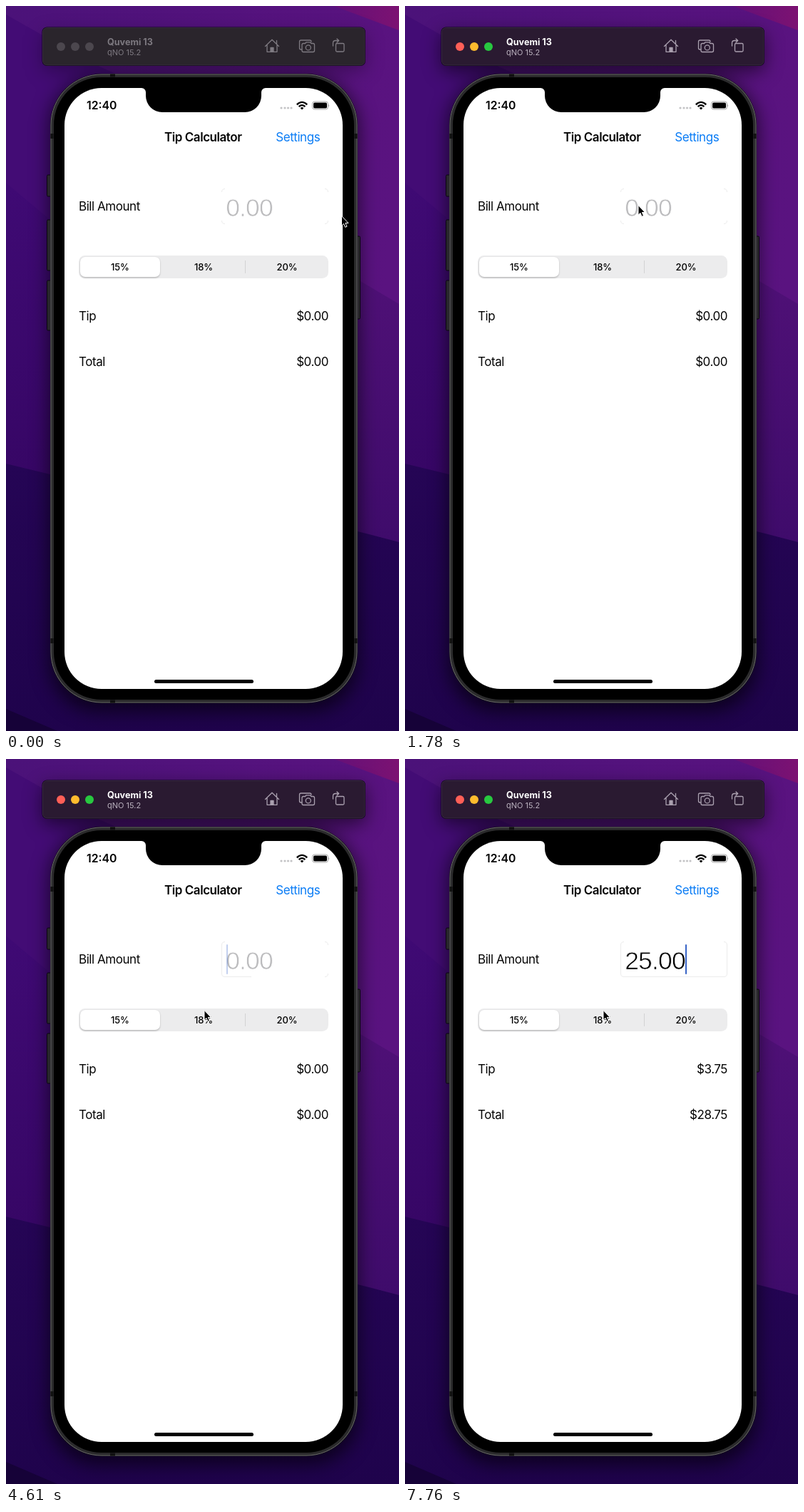
Write an HTML page that moves like this. It is 551x1017 px and loops after 8 s.

```html
<!DOCTYPE html>
<html lang="en">
<head>
<meta charset="utf-8">
<title>Tip Calculator</title>
<style>
  html, body { margin: 0; width: 100%; height: 100%; overflow: hidden; background: #2a0658; }
  svg { display: block; width: 100%; height: 100%; }
  text { font-family: Inter, "Liberation Sans", sans-serif; }
  .body { font-size: 17px; letter-spacing: -.45px; fill: #050505; }
  .seg { font-size: 13px; font-weight: 500; text-anchor: middle; letter-spacing: -.1px; }
  .end { text-anchor: end; }
  /* a white outline slims the digits to a light weight */
  .bill { font: 35.5px "Liberation Sans", Arial, sans-serif; letter-spacing: -.84px; stroke: #fff; stroke-width: .75px; }
  .icon { fill: none; stroke-width: 1.3; stroke-linejoin: round; stroke-linecap: round; }
  #bar { --panel: #2a252c; --title: #7d7980; --sub: #7d7980; --line: #7f7b82; --r: #4c474e; --y: #4c474e; --g: #4c474e; }
  #bar.active { --panel: #2a1a31; --title: #fff; --sub: #b9b0bd; --line: #aaa0af; --r: #ff5f57; --y: #febc2e; --g: #28c840; }
  #bar .icon { stroke: var(--line); }
</style>
</head>
<body>
<svg viewBox="0 0 551 1017" preserveAspectRatio="none">
  <defs>
    <linearGradient id="sky" x2="1" y2=".12"><stop stop-color="#4b1279"/><stop offset="1" stop-color="#5a1380"/></linearGradient>
    <linearGradient id="left" x2="0" y2="1"><stop stop-color="#3f0a74"/><stop offset="1" stop-color="#360664"/></linearGradient>
    <linearGradient id="right" x2="0" y2="1"><stop stop-color="#54127a"/><stop offset="1" stop-color="#3d0b6a"/></linearGradient>
    <linearGradient id="low" x2="0" y2="1"><stop stop-color="#250555"/><stop offset="1" stop-color="#1f034c"/></linearGradient>
    <linearGradient id="pink" x2="1"><stop stop-color="#651078"/><stop offset="1" stop-color="#7c1272"/></linearGradient>
    <filter id="blur" x="-20%" y="-20%" width="140%" height="140%"><feGaussianBlur stdDeviation="13"/></filter>
    <filter id="soft" x="-10%" y="-20%" width="120%" height="150%"><feGaussianBlur stdDeviation="1.3"/></filter>
  </defs>

  <rect width="551" height="1017" fill="url(#sky)"/>
  <path d="M0 12 L120 80 L300 160 V400 H0Z" fill="#430c75"/>
  <path d="M0 248 L62 300 L300 420 V700 H0Z" fill="url(#left)"/>
  <path d="M460 0 H551 V34Z" fill="url(#pink)"/>
  <path d="M300 260 L497 386 L551 418 V800 H300Z" fill="url(#right)"/>
  <path d="M0 642 L62 657 L300 690 L497 738 L551 752 V1017 H0Z" fill="url(#low)"/>
  <path d="M0 986 L72 1017 H0Z" fill="#160238"/>

  <g filter="url(#blur)">
    <rect x="60" y="100" width="435" height="890" rx="70" opacity=".6"/>
    <rect id="barShadow" x="51" y="38" width="453" height="54" rx="8"/>
  </g>

  <g id="bar">
    <rect x="50.5" y="29.5" width="453.500" height="54.500" rx="7" fill="#0d0613"/>
    <rect x="51.500" y="30.500" width="451.500" height="52.500" rx="6" fill="var(--panel)" stroke="#40344a" stroke-width=".7"/>
    <circle cx="77" cy="57" r="6" fill="var(--r)"/>
    <circle cx="97" cy="57" r="6" fill="var(--y)"/>
    <circle cx="117" cy="57" r="6" fill="var(--g)"/>
    <text x="142" y="55" font-size="12.6" font-weight="700" fill="var(--title)">Quvemi 13</text>
    <text x="142" y="69" font-size="11" fill="var(--sub)">qNO 15.2</text>
    <g class="icon">
      <path d="M363.5 56.5 L373 47.3 L382.5 56.5 M366 54.5 V64.3 H380 V54.5 M379.5 53 V48.5"/>
      <path d="M371 64 V58.5 H375 V64Z" fill="var(--line)"/>
      <path d="M414.5 61 H413.5 Q411.5 61 411.5 59 V50 Q411.5 48 413.5 48 H426 Q428 48 428 50"/>
      <path d="M417 52.5 H419.5 L421 50.8 H426.5 L428 52.5 H430.5 Q432.5 52.5 432.5 54.5 V62.5 Q432.5 64.5 430.5 64.5 H417 Q415 64.5 415 62.5 V54.5 Q415 52.5 417 52.5Z"/>
      <circle cx="423.8" cy="58.4" r="3.5"/>
      <rect x="462.5" y="52.5" width="11.5" height="11.5" rx="1.5"/>
      <path d="M458.5 56 V52 Q458.5 48.5 462 48.5 H466 M464 46 L466.7 48.5 L464 51"/>
    </g>
  </g>

  <g fill="#29272c" stroke="#0b0710">
    <rect x="57.5" y="237" width="7" height="30" rx="1.5"/>
    <rect x="57.5" y="300" width="7" height="71" rx="1.5"/>
    <rect x="57.5" y="385" width="7" height="70" rx="1.5"/>
    <rect x="490" y="323" width="6.5" height="116" rx="1.5"/>
  </g>
  <rect x="62" y="95" width="431" height="883" rx="72" fill="#101010"/>
  <rect x="63" y="96" width="429" height="881" rx="71" fill="#2b2b2c" stroke="#69686b"/>
  <path d="M146 97.5 H153 M146 975.5 H153 M64.5 179 V186 M64.5 887 V894 M490.5 179 V186 M490.5 887 V894" stroke="#111" stroke-width="4"/>
  <rect x="67" y="100" width="421" height="873" rx="67" fill="#000"/>
  <rect x="82" y="115" width="390" height="843" rx="52" fill="#fff"/>
  <path d="M190 114 V115 A6 6 0 0 1 196 121 V126 A23 23 0 0 0 219 149 H335 A23 23 0 0 0 358 126 V121 A6 6 0 0 1 364 115 V114Z"/>

  <text x="113" y="145.3" font-size="15.8" font-weight="600">12:40</text>
  <g fill="#c3c3c5"><circle cx="386" cy="143" r="1.6"/><circle cx="391" cy="143" r="1.6"/><circle cx="395.5" cy="143" r="1.6"/><circle cx="400" cy="143" r="1.6"/></g>
  <g fill="none" stroke="#000" stroke-width="2.3">
    <path d="M407.8 138.3 Q415 131.5 422.2 138.3 M410.6 141.2 Q415 137.1 419.4 141.2"/>
    <path d="M415 145.5 L412.6 143 Q415 140.9 417.4 143Z" fill="#000" stroke="none"/>
  </g>
  <rect x="429.5" y="134" width="22" height="11" rx="3.2" fill="none" stroke="#a5a5a5"/>
  <rect x="431" y="135.5" width="19" height="8" rx="1.8"/>
  <path d="M452.5 137.5 Q454 139.5 452.5 141.5Z" fill="#999"/>

  <text class="body" x="222" y="190" font-weight="600">Tip Calculator</text>
  <text class="body" x="378.3" y="190" style="fill:#0a7cf5">Settings</text>
  <text class="body" x="102" y="287">Bill Amount</text>
  <text class="body" x="102" y="441">Tip</text>
  <text class="body" x="102" y="505">Total</text>
  <text class="body end" id="tip" x="452" y="441"></text>
  <text class="body end" id="total" x="452" y="505"></text>

  <g fill="none" stroke="#ececec">
    <path d="M302.5 261 Q302.5 256.5 307 256.5 M447 256.5 Q451.5 256.5 451.5 261 M302.5 301 Q302.5 305.5 307 305.5 M447 305.5 Q451.5 305.5 451.5 301"/>
    <path id="edgeLeft" d="M302.5 260 V301 M307 305.5 H344"/>
    <path id="edgeRest" d="M344 305.5 H447 M451.5 301 V261"/>
  </g>
  <text class="bill" id="bill" x="308.2" y="294.6"></text>
  <rect id="caret" y="260" width="2" height="42" rx="1" fill="#3864c6"/>

  <rect x="102" y="350" width="350" height="32" rx="8.5" fill="#ececed"/>
  <rect x="104" y="353" width="112" height="28.5" rx="7" opacity=".22" filter="url(#soft)"/>
  <rect x="104" y="352" width="112" height="28" rx="7" fill="#fff"/>
  <path d="M335.5 357 V375" stroke="#d2d2d4"/>
  <text class="seg" x="160" y="370.7">15%</text>
  <text class="seg" x="277" y="370.7">18%</text>
  <text class="seg" x="394" y="370.7">20%</text>
  <rect x="208" y="945" width="139" height="5" rx="2.5"/>

  <path id="pointer" d="M.5 .5 V14.2 L3.5 11.4 L5.6 16.3 L8 15.3 L5.9 10.5 H10Z" stroke="#fff"/>
</svg>
<script>
const LOOP = 8000, DIGIT = 18.9, DOT = 9.03;

// [time, x, y]
const pointerSteps = [
  [0, 470, 294], [150, 463, 262], [300, 453, 239], [600, 449, 240],
  [750, 438, 243], [900, 420, 248], [1050, 396, 254], [1200, 370, 260],
  [1350, 344, 268], [1480, 332, 275], [1630, 326.5, 279], [2070, 322, 285],
  [2220, 308, 306], [2370, 292, 332], [2510, 281, 347], [2660, 277.5, 352]
];
// [time, caret opacity]
const caretSteps = [
  [0, 0], [2070, 1], [2510, .3], [2660, 0], [2960, .3], [3110, 1], [3560, .3], [3710, 0],
  [4010, 1], [4610, .3], [4760, 0], [4910, .3], [5060, 1],
  [6410, 0], [6710, .3], [6860, 1]
];
// [time, typed text]
const typingSteps = [[0, ""], [5660, "2"], [5810, "25"], [7310, "25."], [7610, "25.0"], [7760, "25.00"]];

const el = id => document.getElementById(id);
const at = (steps, t) => steps.findLast(step => step[0] <= t);
const money = value => "$" + value.toFixed(2);
const show = (id, on) => el(id).setAttribute("visibility", on ? "visible" : "hidden");

function render(t) {
  const [, x, y] = at(pointerSteps, t);
  el("pointer").setAttribute("transform", `translate(${x} ${y})`);

  const active = t >= 1780;
  el("bar").classList.toggle("active", active);
  el("barShadow").setAttribute("opacity", active ? .55 : .3);

  const typed = at(typingSteps, t)[1];
  el("bill").textContent = typed || "0.00";
  el("bill").setAttribute("fill", typed ? "#000" : "#bcbcbe");
  const amount = Number(typed);
  el("tip").textContent = money(amount * .15);
  el("total").textContent = money(amount * 1.15);

  const width = [...typed].reduce((sum, c) => sum + (c === "." ? DOT : DIGIT), 0);
  el("caret").setAttribute("x", Math.round(308.6 + width));
  el("caret").setAttribute("opacity", at(caretSteps, t)[1]);
  show("edgeLeft", t >= 2370);
  show("edgeRest", t >= 5810);
}

const start = performance.now();
function tick() {
  render((performance.now() - start) % LOOP);
  requestAnimationFrame(tick);
}
tick();
</script>
</body>
</html>
```
